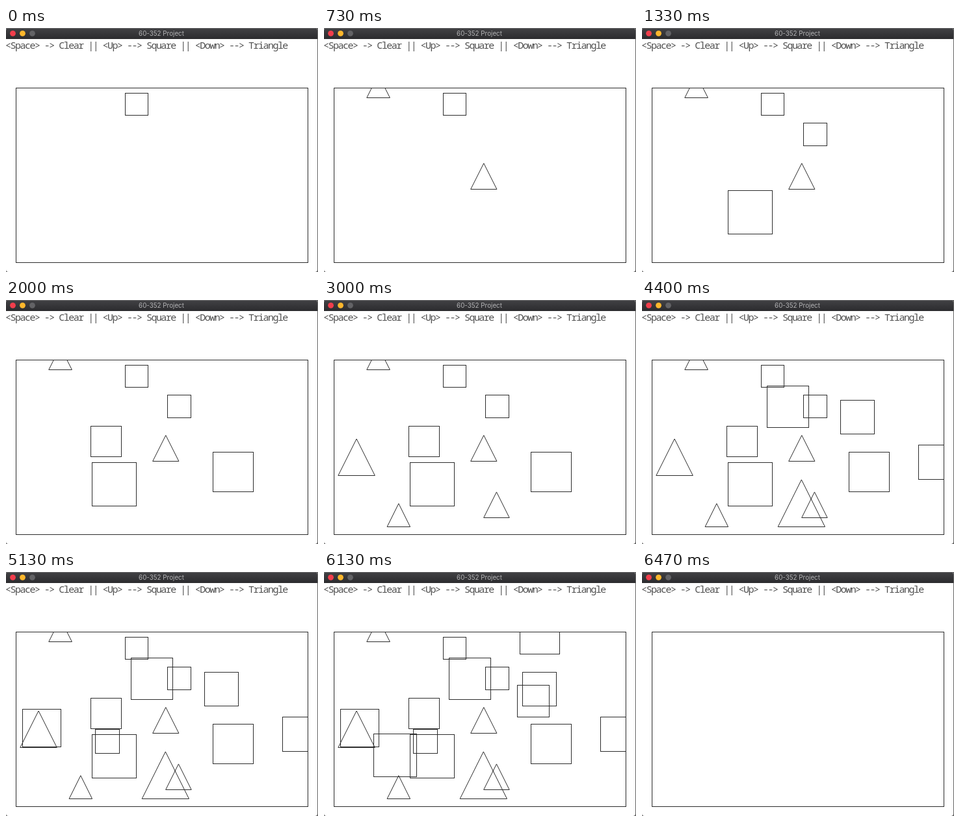
Animation, 480 px wide and 376 px high, one loop 7.07 s. Source, as an HTML page with a canvas:

```html
<!DOCTYPE html>
<html lang="en">
<head>
<meta charset="utf-8">
<title>60-352 Project</title>
<style>
html, body { margin: 0; width: 100%; height: 100%; overflow: hidden; background: #fff; }
canvas { display: block; }
</style>
</head>
<body>
<canvas id="stage" width="480" height="376"></canvas>
<script>
const ctx = document.getElementById('stage').getContext('2d');
const LOOP = 7070, CLEAR = 6470;
const HELP = '<Space> -> Clear || <Up> --> Square || <Down> --> Triangle';
const CELL = 7.48;
const box = { x: 15, y: 92, w: 449, h: 269 };

// start time, kind, left, top, size
const shapes = [
  [0, 'square', 183.2, 99.6, 34.6],
  [330, 'triangle', 65.3, 71.4, 35.6],
  [670, 'triangle', 225.2, 208, 40.2],
  [1000, 'square', 248.2, 145.6, 35.5],
  [1330, 'square', 132.2, 249.6, 67.5],
  [1670, 'square', 130.3, 194.3, 46.5],
  [2000, 'square', 318.4, 233.9, 61.5],
  [2330, 'triangle', 21.3, 213.5, 56.5],
  [2670, 'triangle', 96.6, 313.2, 35.5],
  [3000, 'triangle', 245.2, 295.4, 39.5],
  [3470, 'triangle', 208.7, 276.4, 72.3],
  [3730, 'square', 191.5, 131.8, 64.4],
  [4000, 'square', 425.3, 222.6, 53.5],
  [4400, 'square', 305.1, 153.7, 52.1],
  [4730, 'square', 25.3, 210.5, 58.6],
  [5130, 'square', 136.7, 241.9, 37.5],
  [5470, 'square', 297.1, 173.7, 49.2],
  [5730, 'square', 76.2, 248.7, 66.2],
  [6130, 'square', 301.2, 65, 61.2]
];

// centre of the nearest pixel, for crisp straight edges
const snap = v => Math.round(v) + 0.5;

const paint = {
  square(x, y, s) {
    const left = snap(x), top = snap(y);
    ctx.strokeRect(left, top, snap(x + s) - left, snap(y + s) - top);
  },
  triangle(x, y, s) {
    const base = snap(y + s);
    ctx.beginPath();
    ctx.moveTo(x + 0.5, base);
    ctx.lineTo(x + s / 2 + 0.5, y + 0.5);
    ctx.lineTo(x + s + 0.5, base);
    ctx.closePath();
    ctx.stroke();
  }
};

function dot(x, color) {
  ctx.fillStyle = color;
  ctx.beginPath();
  ctx.arc(x, 8.3, 4.4, 0, Math.PI * 2);
  ctx.fill();
}

function drawWindow() {
  ctx.fillStyle = '#666';
  ctx.fillRect(0, 0, 480, 376);
  ctx.fillStyle = '#fff';
  ctx.beginPath();
  ctx.roundRect(0, 0, 479, 376, 4);
  ctx.fill();

  const bar = ctx.createLinearGradient(0, 0, 0, 17);
  bar.addColorStop(0, '#424245');
  bar.addColorStop(1, '#2b2b2e');
  ctx.fillStyle = bar;
  ctx.beginPath();
  ctx.roundRect(0, 0, 479, 17, [4, 4, 0, 0]);
  ctx.fill();
  ctx.fillStyle = '#6b6b6d';
  ctx.fillRect(3, 0, 473, 1);
  dot(10.5, '#f23e4c');
  dot(25.5, '#fdb72c');
  dot(40.5, '#636366');

  ctx.fillStyle = '#b4b4b6';
  ctx.font = '9.8px Inter, "Liberation Sans", sans-serif';
  ctx.textAlign = 'center';
  ctx.letterSpacing = '0px';
  ctx.fillText('60-352 Project', 239, 12);
}

function drawHelp() {
  ctx.fillStyle = '#505050';
  ctx.font = '15px "Noto Sans Mono", "DejaVu Sans Mono", monospace';
  ctx.textAlign = 'left';
  ctx.letterSpacing = '0px';
  // tighten tracking to the terminal cell
  ctx.letterSpacing = (CELL - ctx.measureText('0').width) + 'px';
  ctx.fillText(HELP, -1, 32);
}

function drawShapes(t) {
  ctx.strokeStyle = '#2c2c2c';
  ctx.lineWidth = 1;
  ctx.strokeRect(box.x + 0.5, box.y + 0.5, box.w, box.h);
  if (t >= CLEAR) return;
  ctx.save();
  ctx.beginPath();
  ctx.rect(box.x, box.y, box.w + 1, box.h + 1);
  ctx.clip();
  for (const [start, kind, x, y, size] of shapes) {
    if (t >= start) paint[kind](x, y, size);
  }
  ctx.restore();
}

const origin = performance.now();
function frame() {
  drawWindow();
  drawHelp();
  drawShapes((performance.now() - origin) % LOOP);
  requestAnimationFrame(frame);
}
frame();
</script>
</body>
</html>
```
